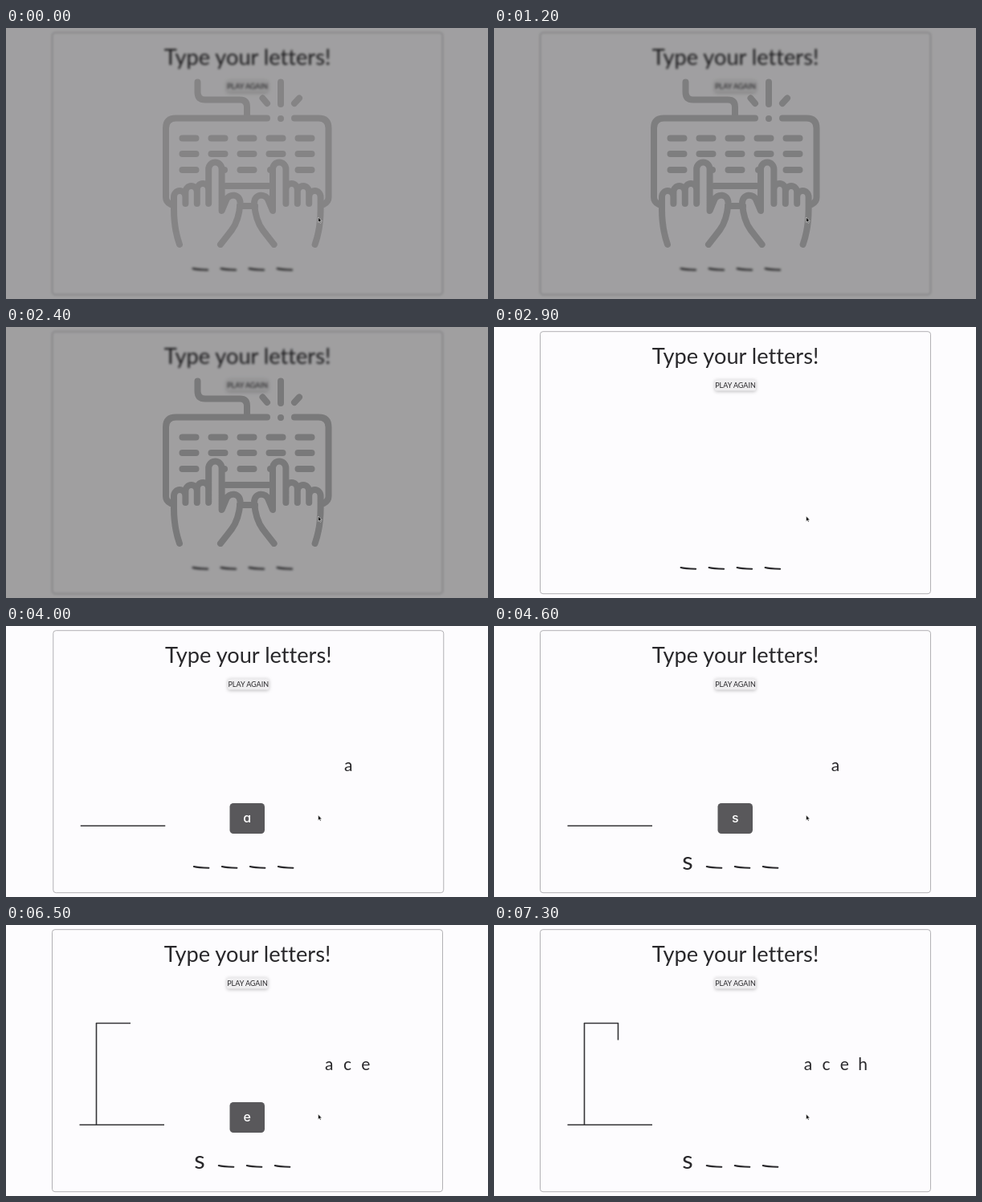
An HTML page that plays this animation: 600x338 px, repeating every 8000 ms.

```html
<!DOCTYPE html>
<html lang="en">
<head>
<meta charset="utf-8">
<title>Type your letters!</title>
<style>
  html, body { margin: 0; width: 100%; height: 100%; overflow: hidden; background: #fdfcfe; }
  svg { display: block; width: 100%; height: 100%; }
  text { font-family: Lato, sans-serif; font-variant-ligatures: none; fill: #29282b; text-anchor: middle; }
  .line { fill: none; stroke: #353437; stroke-width: 1.6; }
  .pen { stroke: #29282b; stroke-width: 2.1; stroke-linecap: round; }
  #button { fill: #efeef0; filter: drop-shadow(0 1.5px 2px #0004); }
  #keyLetter { font-family: Inter, sans-serif; font-feature-settings: "cv11"; fill: #fff; }
  #icon { fill: none; stroke: #000; stroke-width: 8; stroke-linecap: round; stroke-linejoin: round; }
</style>
</head>
<body>
<svg viewBox="0 0 600 338">
  <rect width="600" height="338" fill="#fdfcfe"/>
  <g id="scene">
    <g id="card">
      <rect x="57.5" y="5.700" width="486" height="327" rx="3.500" fill="none" stroke="#b2b1b4"/>
      <text x="300.5" y="46" font-size="27.200">Type your letters!</text>
      <rect id="button" x="275" y="65.500" width="51" height="14" rx="2"/>
      <text x="300.5" y="75.5" font-size="9">PLAY AGAIN</text>
      <g class="line" id="gallows">
        <path d="M91.500 249.300H197"/>
        <path d="M112.500 249.300V122"/>
        <path d="M112 122.500H155"/>
        <path d="M154.500 122V143.500"/>
      </g>
      <g id="misses"></g>
      <g id="word"></g>
    </g>
    <g id="key">
      <rect x="278.5" y="221" width="43.5" height="38" rx="4.500" fill="#59585b"/>
      <text id="keyLetter" x="300.2" y="244.700" font-size="16" font-weight="500"></text>
    </g>
  </g>
  <g id="overlay">
    <rect width="600" height="338" opacity=".37"/>
    <g id="icon">
      <path d="M238.5 67.5V80q0 9.500 9.500 9.500H291q9 0 9 9V112"/>
      <path d="M205 220q-6-3-6-9V125q0-12.500 12.500-12.500H325M359 112.500H389q12.500 0 12.500 12.500V211q0 6-6 9"/>
      <path d="M342 113h.01M342 67.500V95M319.500 87.500l5.500 6.500M365 87.500l-6 6.500"/>
      <path id="keys"/>
      <path d="M274 197H327M291 222H310"/>
      <path id="hand" d="M216 270Q209 250 209 226V211a7.200 8 0 0 1 14.400 0V219
        V205a7.200 8 0 0 1 14.400 0V219V202a7.200 8 0 0 1 14.400 0V219
        V176a8.200 8.500 0 0 1 16.400 0V228L274 215C277 206 292 206 291.500 219Q290 240 281 252L267 270"/>
      <use href="#hand" transform="translate(600.6) scale(-1 1)"/>
    </g>
  </g>
  <path d="M388.600 236v6.400l1.500-1.300 1 2.200 1.100-.5-1-2.100h2z" fill="#111" stroke="#fff" stroke-width=".5"/>
</svg>
<script>
const $ = id => document.getElementById(id);
const LOOP = 8000;
const presses = [
  { letter: 'a', from: 3600, to: 4400 },
  { letter: 's', from: 4600, to: 5400, hit: true },
  { letter: 'c', from: 5600, to: 6400 },
  { letter: 'e', from: 6500, to: 6950 },
  { letter: 'h', from: 6950, to: 7300 },
];
const shakeStarts = [3655, 5595, 6500];
const shakeStops = [0, -1, 2, -4, 4, -4, 4, -4, 2, -1, 0];

const clamp = x => Math.min(1, Math.max(0, x));

// CSS-style cubic-bezier timing function, solved by bisection
function bezier(x1, y1, x2, y2) {
  const at = (a, b, s) => 3 * a * s * (1 - s) ** 2 + 3 * b * s * s * (1 - s) + s ** 3;
  return x => {
    let lo = 0, hi = 1;
    for (let i = 0; i < 20; i++) {
      const mid = (lo + hi) / 2;
      if (at(x1, x2, mid) < x) lo = mid; else hi = mid;
    }
    return at(y1, y2, lo);
  };
}
const ease = bezier(.25, .1, .25, 1);
const snap = bezier(.36, .07, .19, .97);

function shakeOffset(t) {
  const start = shakeStarts.find(s => t >= s && t < s + 820);
  if (start === undefined) return 0;
  const p = (t - start) / 82, i = Math.floor(p);
  return .6 * (shakeStops[i] + (shakeStops[i + 1] - shakeStops[i]) * snap(p - i));
}

// Icon darkness swings back and forth, easing into each turn
function pulse(t) {
  const p = (t + 80) / 575, y = ease(p % 1);
  return .13 + .21 * (Math.floor(p) % 2 ? 1 - y : y);
}

function keyRows() {
  let d = '';
  for (const y of [137.5, 157, 177])
    for (let col = 0; col < 5; col++) {
      const x = 228 + col * 36, covered = y === 177 && col % 2;
      if (!covered) d += `M${x - 8.5} ${y}h17`;
    }
  return d + 'M269 177h3M329 177h3';
}

let shown = '';
function setLetters(misses, hit) {
  const state = misses.join('') + hit;
  if (state === shown) return;
  shown = state;
  $('misses').innerHTML = misses.map((m, i) =>
    `<text x="${425 + (i - (misses.length - 1) / 2) * 22.7}" y="180.5" font-size="21">${m}</text>`).join('');
  let word = hit ? '<text x="241" y="303.5" font-size="31">s</text>' : '';
  for (let i = hit ? 1 : 0; i < 4; i++)
    word += `<path class="line pen" d="M${(hit ? 229.8 : 232.6) + i * 35} 300q5 1.4 18.5 1.7"/>`;
  $('word').innerHTML = word;
}

function draw(now) {
  const t = now % LOOP;
  const veil = 1 - ease(clamp((t - 2400) / 500));
  $('overlay').setAttribute('opacity', veil);
  $('icon').setAttribute('opacity', pulse(t));
  $('scene').style.filter = veil > .01 ? `blur(${1.5 * veil}px)` : 'none';

  const typed = presses.filter(p => t >= p.from);
  const misses = typed.filter(p => !p.hit).map(p => p.letter);
  setLetters(misses, typed.some(p => p.hit));
  [...$('gallows').children].forEach((part, i) =>
    part.setAttribute('visibility', i < misses.length ? 'visible' : 'hidden'));

  const active = typed.find(p => t < p.to);
  $('key').setAttribute('visibility', active ? 'visible' : 'hidden');
  $('keyLetter').textContent = active ? active.letter : '';
  $('card').setAttribute('transform', `translate(${shakeOffset(t)})`);
}

$('keys').setAttribute('d', keyRows());
const start = performance.now();
function tick() {
  draw(performance.now() - start);
  requestAnimationFrame(tick);
}
tick();
</script>
</body>
</html>
```
